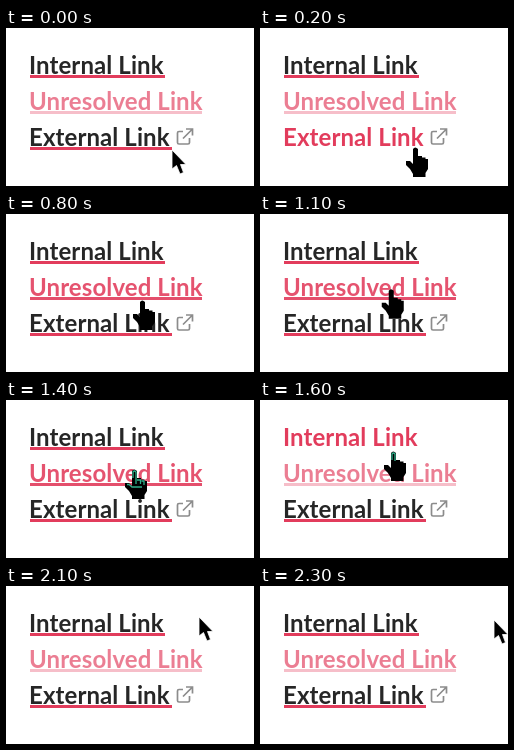
An HTML page that plays this animation: 248x158 px, repeating every 2.4 s.

```html
<!DOCTYPE html>
<html lang="en">
<head>
<meta charset="utf-8">
<title>Link hover</title>
<style>
  html, body { margin: 0; width: 100%; height: 100%; overflow: hidden; background: #fff; }
  svg { display: block; }
  text { font: 700 24px Lato, Inter, sans-serif; letter-spacing: .1px; }
  .line { fill: #e23c5c; }
</style>
</head>
<body>
<svg width="248" height="158" viewBox="0 0 248 158">
  <g id="links"></g>
  <path d="M177 103.5H173Q171.500 103.500 171.500 105V114.500Q171.500 116 173 116H182Q183.500 116 183.500 114.500V110M177 110.500L186 101.500M180 101H186.500V107.500"
    fill="none" stroke="#8c8c8c" stroke-width="1.7"/>
  <g id="arrow" stroke="#fff" stroke-width=".8">
    <path d="M0 0V19L4.500 15.500L8 24L11.500 22.500L8.500 14.500H14Z"/>
  </g>
  <g id="hand">
    <path d="M-2 1Q0 -2 3 1V8H7V9.500H10.500V11H13V21L10.500 25V29H-2V26L-5 21L-9 17V13H-5L-2 16Z"/>
    <g fill="none" stroke="#2fae8a" stroke-width="1.300">
      <path id="finger" d="M-1 8V2Q.5 0 2 2V9"/>
      <path id="knuckles" d="M2 9V14M3 10H6.500V14M7.500 11H10V15M-7 14.500H-5L-2 17H8"/>
    </g>
  </g>
</svg>
<script>
const LOOP = 2400, STEP = 100, RED = '#e23c5c', DARK = '#262626';
const $ = id => document.getElementById(id);

// Baseline, underline width and the hover interval of each link
const links = [
  { label: 'Internal Link', y: 45.5, width: 135, from: 1600, to: 1900 },
  { label: 'Unresolved Link', y: 81.5, width: 172, from: 700, to: 1600, faint: true },
  { label: 'External Link', y: 117.5, width: 142, from: 200, to: 700 }
];

// Pointer path: time, x, y
const path = [
  [0, 166, 122], [200, 155, 120], [500, 145, 117], [600, 143, 106], [800, 136, 87],
  [1200, 129, 72], [1400, 128, 70], [1600, 133, 52], [1800, 138, 38],
  [1900, 151, 34], [2100, 193, 31], [2300, 234, 34]
];

function add(tag, attrs) {
  const node = document.createElementNS('http://www.w3.org/2000/svg', tag);
  for (const key in attrs) node.setAttribute(key, attrs[key]);
  return $('links').appendChild(node);
}

for (const link of links) {
  link.text = add('text', { x: 23, y: link.y });
  link.text.textContent = link.label;
  link.line = add('rect', { class: 'line', x: 24, y: link.y + 1.5, width: link.width, height: 3 });
}

function pointerAt(t) {
  const i = path.findIndex(p => p[0] > t);
  if (i < 0) return path[path.length - 1].slice(1);
  const [a, b] = [path[i - 1], path[i]];
  const k = (t - a[0]) / (b[0] - a[0]);
  return [a[1] + (b[1] - a[1]) * k, a[2] + (b[2] - a[2]) * k];
}

function show(id, visible) {
  $(id).style.display = visible ? '' : 'none';
}

function draw(t) {
  // Hover hides a solid underline and brings a faint link to full strength
  for (const { text, line, from, to, faint } of links) {
    const hover = t >= from && t < to;
    text.setAttribute('fill', faint || hover ? RED : DARK);
    text.setAttribute('opacity', faint ? (hover ? .88 : .66) : 1);
    line.setAttribute('opacity', faint ? (hover ? .9 : .33) : +!hover);
  }
  const pointing = t >= 200 && t < 1900;
  const [x, y] = pointerAt(t);
  for (const id of ['hand', 'arrow']) $(id).setAttribute('transform', `translate(${x} ${y})`);
  show('hand', pointing);
  show('arrow', !pointing);
  show('finger', t >= 1300);
  show('knuckles', t >= 1300 && t < 1600);
}

const start = performance.now();
function tick() {
  const t = (performance.now() - start) % LOOP;
  draw(Math.floor(t / STEP) * STEP);
  requestAnimationFrame(tick);
}
tick();
</script>
</body>
</html>
```
